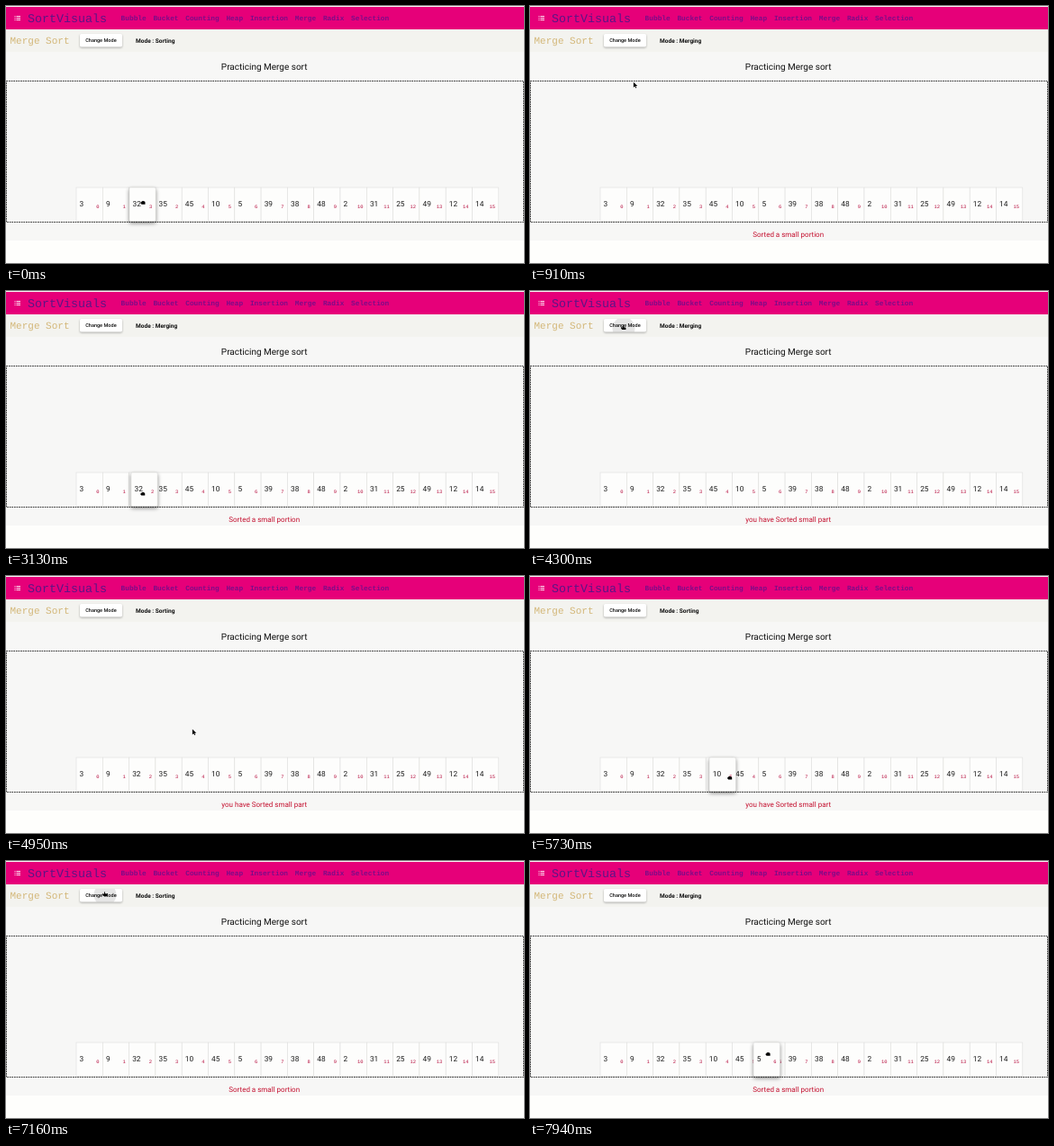
Write an HTML page that moves like this. It is 575 px wide and 286 px high and loops after 8000 ms.

```html
<!DOCTYPE html>
<html lang="en">
<head>
<meta charset="utf-8">
<title>Merge sort practice</title>
<style>
  html, body { margin: 0; width: 100%; height: 100%; overflow: hidden; background: #fefefc; }
  svg { display: block; width: 575px; height: 286px; font-family: Roboto, sans-serif; text-rendering: geometricPrecision; }
  .mono { font-family: "Liberation Mono", monospace; }
  .nav { font-size: 7.8px; font-weight: bold; fill: #7c0c88; }
  .cell { fill: #fdfdfc; stroke: #dededc; stroke-width: .6; }
  .number { font-size: 8.33px; fill: #1c1c1c; }
  .index { font-size: 5.42px; fill: #b5093b; text-anchor: end; }
  .lifted { filter: drop-shadow(0 2px 2px rgba(0, 0, 0, .45)); }
  .button { fill: #fff; filter: drop-shadow(0 1px 1px rgba(0, 0, 0, .3)); }
</style>
</head>
<body>
<svg viewBox="0 0 575 286">
  <defs><clipPath id="buttonClip"><rect x="82" y="31" width="47" height="14.5" rx="1.7"/></clipPath></defs>
  <rect width="575" height="261" fill="#f7f7f6"/>
  <rect y="26" width="575" height="25" fill="#f3f3ef"/>
  <rect y="1" width="575" height="25" fill="#e60079"/>
  <path d="M9.5 11.5h1M9.5 13.5h1M9.5 15.5h1M11.5 11.5h4.5M11.5 13.5h4.5M11.5 15.5h4.5" stroke="#fff" stroke-width=".9"/>
  <text class="mono" x="24" y="17.8" font-size="13.33" fill="#5d1486">SortVisuals</text>
  <g id="nav" class="mono nav"></g>
  <text class="mono" x="4.5" y="42" font-size="11" fill="#d3b778">Merge Sort</text>
  <rect class="button" x="82" y="31" width="47" height="14.5" rx="1.7"/>
  <g clip-path="url(#buttonClip)"><circle id="ripple" fill="#000"/></g>
  <text x="105.4" y="40.4" font-size="5.55" font-weight="500" text-anchor="middle" fill="#111">Change Mode</text>
  <text id="mode" x="144" y="40.8" font-size="6.55" font-weight="700" fill="#111"></text>
  <text x="286.7" y="70.5" font-size="10" text-anchor="middle" fill="#111">Practicing Merge sort</text>
  <rect x=".5" y="83.5" width="574" height="157" fill="none" stroke="#222" stroke-width=".9" stroke-dasharray="1.7 .9"/>
  <g id="cards"></g>
  <text id="message" x="286.7" y="256.5" font-size="8" text-anchor="middle" fill="#c4102f"></text>
  <path id="cursor" fill="#000"/>
</svg>
<script>
const LOOP = 8000, STEP = 130, LAG = 25;
const LEFT = 78, TOP = 202, CELL = 29.3, HEIGHT = 37.5;
const START = [3, 9, 35, 32, 45, 10, 5, 39, 38, 48, 2, 31, 25, 49, 12, 14];

// Pointer moves: depart, arrive, x, y. Arriving above the cards presses the button.
const HOME = { x: 181, y: 219 };
const MOVES = [
  [-400, -30, 152, 219], [260, 560, 106, 40], [780, 1170, 148, 224],
  [1690, 2020, 130, 224], [2210, 2470, 126, 225], [2740, 3200, 154, 226],
  [3520, 4190, 104, 41.5], [4430, 5210, 249, 224], [5330, 5860, 216, 225],
  [6250, 7050, 110, 37.5], [7290, 7800, 271, 215], [7800, 7940, 264, 215]
].map(([depart, arrive, x, y]) => ({ depart, arrive, x, y }));
const PRESSES = MOVES.filter(m => m.y < TOP).map(m => m.arrive);
const RELEASE = 220;
const DRAGS = [[-500, 260], [1690, 3380], [5330, 6110], [7790, LOOP + 1]]
  .map(([begin, end]) => ({ begin, end }));

const SHAPES = {
  fist: "M-2.7.2q.2-1 1-.9q.2-1.3 1-1q.7-.8 1.3-.1q.7-.3 1 .4q1 .1 .9 1.2v1.9h-4z",
  hand: "M-1-3q.8-.6.9.3v1.4q2.3 0 2.5.9v2h-4.2l-1.4-2.2q.1-.8.9-.5l1.2.5z",
  arrow: "M-2-3v6l1.5-1.4l1 2.1l.9-.4l-1-2.1h2z"
};
const byId = id => document.getElementById(id);
const slotLeft = slot => LEFT + slot * CELL;
const slotAt = x => Math.floor((x - LEFT) / CELL);
const ease = k => k * k * (3 - 2 * k);

function pointer(t) {
  let p = HOME;
  for (const m of MOVES) {
    const k = ease(Math.min(1, Math.max(0, (t - m.depart) / (m.arrive - m.depart))));
    p = { x: p.x + (m.x - p.x) * k, y: p.y + (m.y - p.y) * k };
  }
  return p;
}

const isMerging = t => PRESSES.filter(press => press + RELEASE <= t).length % 2 === 1;

function messageAt(t) {
  const drop = DRAGS.filter(d => d.end <= t).pop();
  if (!drop) return "";
  return isMerging(drop.end) ? "you have Sorted small part" : "Sorted a small portion";
}

function move(list, from, to) {
  list.splice(to, 0, list.splice(from, 1)[0]);
}

function card({ value, index }, x, lifted) {
  return `<g transform="translate(${x} ${TOP})">
    <rect class="cell ${lifted ? "lifted" : ""}" width="${CELL}" height="${HEIGHT}" rx="${lifted ? 1.5 : 0}"/>
    <text class="number" x="3.6" y="21.2">${value}</text>
    <text class="mono index" x="25.4" y="23.3">${index}</text></g>`;
}

function drawCards(t, x) {
  const values = START.slice();
  for (const d of DRAGS)
    if (d.end <= t) move(values, slotAt(pointer(d.begin).x), slotAt(pointer(d.end).x));
  const cards = values.map((value, index) => ({ value, index }));
  const drag = DRAGS.find(d => d.begin <= t && t < d.end);
  let preview = "";
  if (drag) {
    const grab = pointer(drag.begin).x, from = slotAt(grab);
    preview = card(cards[from], slotLeft(from) + pointer(t - LAG).x - grab, true);
    move(cards, from, slotAt(x));
  }
  byId("cards").innerHTML = cards.map((c, slot) => card(c, slotLeft(slot))).join("") + preview;
}

function drawRipple(t, { x, y }) {
  const age = t - (PRESSES.filter(press => press <= t).pop() ?? -LOOP);
  const ripple = byId("ripple");
  ripple.setAttribute("cx", x);
  ripple.setAttribute("cy", y);
  ripple.setAttribute("r", 4 + age * .085);
  ripple.setAttribute("opacity", Math.max(0, .1 * (1 - Math.max(0, age - 110) / 250)));
}

function draw(time) {
  const t = Math.floor((time % LOOP) / STEP) * STEP;
  const p = pointer(t);
  byId("mode").textContent = "Mode : " + (isMerging(t) ? "Merging" : "Sorting");
  byId("message").textContent = messageAt(t);
  drawCards(t, p.x);
  drawRipple(t, p);
  const shape = p.y > TOP ? "fist" : p.y > 31 && p.y < 46 ? "hand" : "arrow";
  byId("cursor").setAttribute("d", SHAPES[shape]);
  byId("cursor").setAttribute("transform", `translate(${p.x} ${p.y})`);
}

let navX = 127.6;
for (const name of "Bubble Bucket Counting Heap Insertion Merge Radix Selection".split(" ")) {
  byId("nav").innerHTML += `<text x="${navX}" y="15.9">${name}</text>`;
  navX += name.length * 4.68 + 7.75;
}

const began = performance.now();
function tick() {
  draw(performance.now() - began);
  requestAnimationFrame(tick);
}
tick();
</script>
</body>
</html>
```
